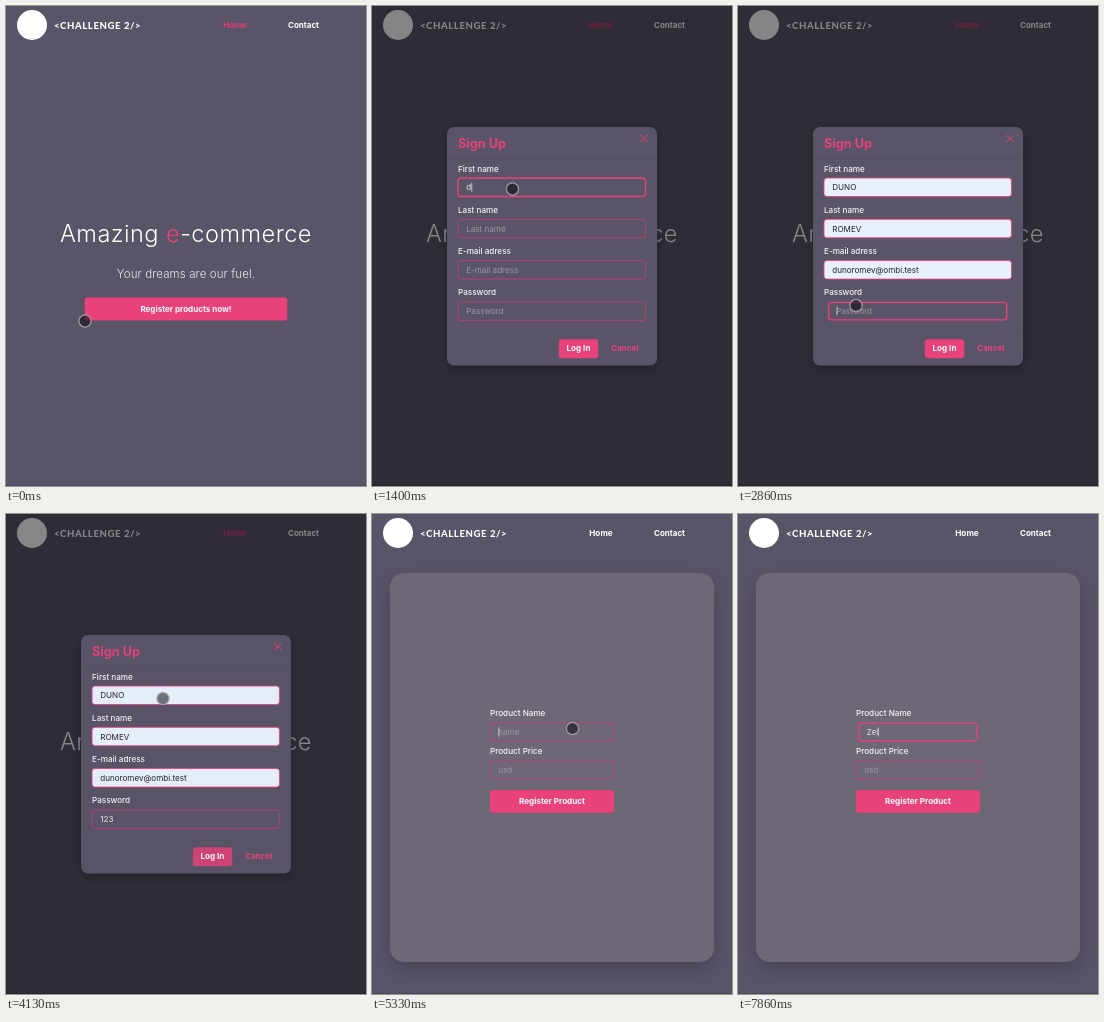
Recreate the animation shown at these times as an HTML page. Size 360 by 480 pixels, loop 8000 ms.

```html
<!DOCTYPE html>
<html lang="en">
<head>
<meta charset="utf-8">
<title>Shop sign-up</title>
<style>
html, body { margin: 0; width: 100%; height: 100%; overflow: hidden; background: #5a5468; }
svg { display: block; width: 100%; height: 100%; }
text { font-family: Inter, "Open Sans", sans-serif; font-optical-sizing: none; fill: #fff; white-space: pre; }
.bold { font-weight: 700; }
.label { font-weight: 450; fill: #f6f5f8; }
.pink { fill: #e9417a; }
.mid { text-anchor: middle; }
</style>
</head>
<body>
<svg id="stage" viewBox="0 0 360 480"></svg>
<script>
const LOOP = 8000;
const PINK = '#e9417a', BG = '#5a5468';

const rect = (x, y, w, h, r, fill, more = '') =>
  `<rect x="${x}" y="${y}" width="${w}" height="${h}" rx="${r}" fill="${fill}" ${more}/>`;
const text = (x, y, cls, size, str, more = '') =>
  `<text x="${x}" y="${y}" class="${cls}" font-size="${size}" ${more}>${str}</text>`;
const field = (id, x, y, w, label) =>
  text(x, y - 6.5, 'label', 8.15, label) +
  `<g id="${id}">${rect(x, y, w, 18.5, 3, 'none')}
   ${text(x + 8.2, y + 12.4, '', 8.1, '')}${rect(x + 8, y + 4.6, .7, 9.4, 0, '#e4e2e8')}</g>`;

const stage = document.getElementById('stage');
stage.innerHTML = `
${rect(0, 0, 360, 480, 0, BG)}
${rect(0, 479, 360, 1, 0, '#4d4759')}
<circle cx="26" cy="19" r="15" fill="#fff"/>
<text x="48" y="23" font-size="9.6" font-weight="800" letter-spacing=".56"
  style="font-family:Lato,sans-serif">&lt;CHALLENGE 2/&gt;</text>
${text(229, 22, 'bold mid', 8.2, 'Home', 'id="homeLink"')}
${text(297.5, 22, 'bold mid', 8, 'Contact')}
<g id="home">
  ${text(180, 236, 'mid', 23.6, `Amazing <tspan fill="${PINK}">e</tspan>-commerce`, 'font-weight="330" letter-spacing=".45"')}
  ${text(180, 272, 'mid', 11.5, 'Your dreams are our fuel.', 'letter-spacing=".12" font-weight="350" style="fill:#ebe9ee"')}
  ${rect(78.7, 291.6, 202.6, 22.8, 3, PINK)}
  ${text(180, 305.8, 'bold mid', 8.05, 'Register products now!')}
</g>
<g id="shop">
  ${rect(18, 59, 324, 389, 14, '#6d6776', 'style="filter:drop-shadow(0 8px 11px rgba(20,15,30,.25))"')}
  ${field('product', 118, 208.7, 124, 'Product Name')}
  ${field('price', 118, 246.4, 124, 'Product Price')}
  ${rect(118, 276, 124, 22.8, 3, PINK)}
  ${text(180, 290.2, 'bold mid', 8.1, 'Register Product')}
</g>
<rect id="shade" width="360" height="480" fill="#000"/>
<g id="modal">
  ${rect(75, 121, 210, 238.5, 7, BG, 'style="filter:drop-shadow(0 4px 5px rgba(0,0,0,.25))"')}
  ${text(86, 141.6, 'bold pink', 12.7, 'Sign Up')}
  <path d="M268.4 128.9l7.2 7.2m0-7.2l-7.2 7.2" stroke="${PINK}" stroke-width="1"/>
  <path d="M75 153.5H285M75 325.8H285" stroke="#544e61" stroke-width=".8"/>
  ${field('first', 86, 172, 187.5, 'First name')}
  ${field('last', 86, 213.3, 187.5, 'Last name')}
  ${field('mail', 86, 254.6, 187.5, 'E-mail adress')}
  ${field('pass', 86, 295.9, 187.5, 'Password')}
  <g id="login">${rect(186.8, 333.2, 39.4, 19, 3, PINK)}</g>
  ${text(206.5, 345.4, 'bold mid', 8.1, 'Log In')}
  ${text(252.7, 345.4, 'bold mid pink', 8.1, 'Cancel')}
</g>
<g id="tap">
  ${rect(79, 291.7, 202, 22.6, 1, '#668bb0')}
  ${text(180, 305.8, 'bold mid', 8.05, 'Register products now!', 'style="fill:#66aac8"')}
</g>
<circle id="cursor" r="6.1" fill="rgba(8,8,12,.54)" stroke="rgba(170,168,174,.85)" stroke-width="1.3"/>`;

const $ = id => document.getElementById(id);
const clamp = v => Math.min(1, Math.max(0, v));
const ramp = (t, from, to) => clamp((t - from) / (to - from));
const easeOut = p => 1 - (1 - p) ** 3;
const smooth = p => p * p * (3 - 2 * p);
const show = (id, alpha) => {
  $(id).setAttribute('opacity', alpha);
  $(id).style.display = alpha > 0 ? '' : 'none';
};
const scaleAt = (x, y, s) => `translate(${x} ${y}) scale(${s}) translate(${-x} ${-y})`;

// time, x, y
const path = [
  [0, 79, 315], [60, 79, 315], [330, 152, 299], [900, 152, 299],
  [1230, 140.5, 183], [1480, 140.5, 183], [1720, 120, 207], [2330, 120, 207],
  [2630, 118, 299.5], [3500, 118, 299.5], [3800, 206, 342], [3950, 206, 342],
  [4120, 157, 184.5], [4450, 157, 184.5], [5060, 200.5, 214.5], [LOOP, 200.5, 214.5]
];

function cursorAt(t) {
  const i = path.findIndex(p => p[0] > t);
  const [t0, x0, y0] = path[i - 1], [t1, x1, y1] = path[i];
  const p = smooth(ramp(t, t0, t1));
  return [x0 + (x1 - x0) * p, y0 + (y1 - y0) * p];
}

function typed(t, str, times) {
  return str.slice(0, times.filter(at => t >= at).length);
}

function setField(id, value, hint, { focus = false, caret = false, fill = false, shrink = 0 } = {}) {
  const [box, label, bar] = $(id).children;
  box.setAttribute('fill', fill ? '#e8f0fe' : 'transparent');
  box.setAttribute('stroke', focus || fill ? PINK : '#c03f74');
  box.setAttribute('stroke-width', focus ? 1.4 : .85);
  label.textContent = value || hint;
  label.style.fill = fill ? '#24222b' : value ? '#eceaf0' : '#9c96a4';
  const x = +label.getAttribute('x');
  bar.setAttribute('x', x + (value ? label.getComputedTextLength() + .3 : .2));
  bar.style.display = caret ? '' : 'none';
  const cx = +box.getAttribute('x') + box.getAttribute('width') / 2;
  const cy = +box.getAttribute('y') + 9.25;
  $(id).setAttribute('transform', scaleAt(cx, cy, 1 - .05 * shrink));
}

const blink = (t, start) => Math.floor((t - start) / 510) % 2 === 0;

function drawModal(t) {
  const open = easeOut(ramp(t, 474, 674));
  const close = ramp(t, 4115, 4260) ** 2;
  const alpha = open * (1 - close);
  show('shade', .48 * alpha);
  show('modal', alpha);
  if (!alpha) return;
  $('modal').setAttribute('transform', scaleAt(180, 240, .95 + .05 * alpha));

  const fill = t >= 1860;
  const onFirst = t < 2660, onPass = !onFirst && t < 3950;
  setField('first', fill ? 'DUNO' : t >= 1380 ? 'd' : '', 'First name', {
    focus: onFirst && t >= 600, fill, caret: onFirst && !fill && (t >= 1380 || blink(t, 500))
  });
  setField('last', fill ? 'ROMEV' : '', 'Last name', { fill });
  setField('mail', fill ? 'dunoromev@ombi.test' : '', 'E-mail adress', { fill });
  setField('pass', typed(t, '123', [3210, 3340, 3470]), 'Password', {
    focus: onPass, caret: onPass && (t >= 3210 || blink(t, 2660)),
    shrink: smooth(ramp(t, 2660, 2850)) * (1 - smooth(ramp(t, 3950, 4080)))
  });
  $('login').setAttribute('opacity', t >= 3950 ? .82 : 1);
}

function drawShop(t) {
  const alpha = smooth(ramp(t, 4330, 4680));
  show('shop', alpha);
  show('home', 1 - ramp(t, 4330, 4430));
  $('homeLink').style.fill = t < 4330 ? '#dc3d75' : '#fff';
  if (!alpha) return;
  const name = typed(t, 'Zel', [7330, 7530, 7800]);
  const focus = t >= 5300;
  setField('product', name, 'name', {
    focus: t >= 5360, caret: focus && (name || blink(t, 5295)),
    shrink: smooth(ramp(t, 5300, 5530))
  });
  setField('price', '', 'usd');
}

function draw(t) {
  drawModal(t);
  drawShop(t);
  show('tap', .82 * ramp(t, 390, 450) * (1 - ramp(t, 560, 760)));
  const [x, y] = cursorAt(t);
  $('cursor').setAttribute('cx', x);
  $('cursor').setAttribute('cy', y);
  show('cursor', t < 5790 ? 1 : 0);
}

let start;
function tick(now) {
  start ??= now;
  draw((now - start) % LOOP);
  requestAnimationFrame(tick);
}
draw(0);
requestAnimationFrame(tick);
</script>
</body>
</html>
```
